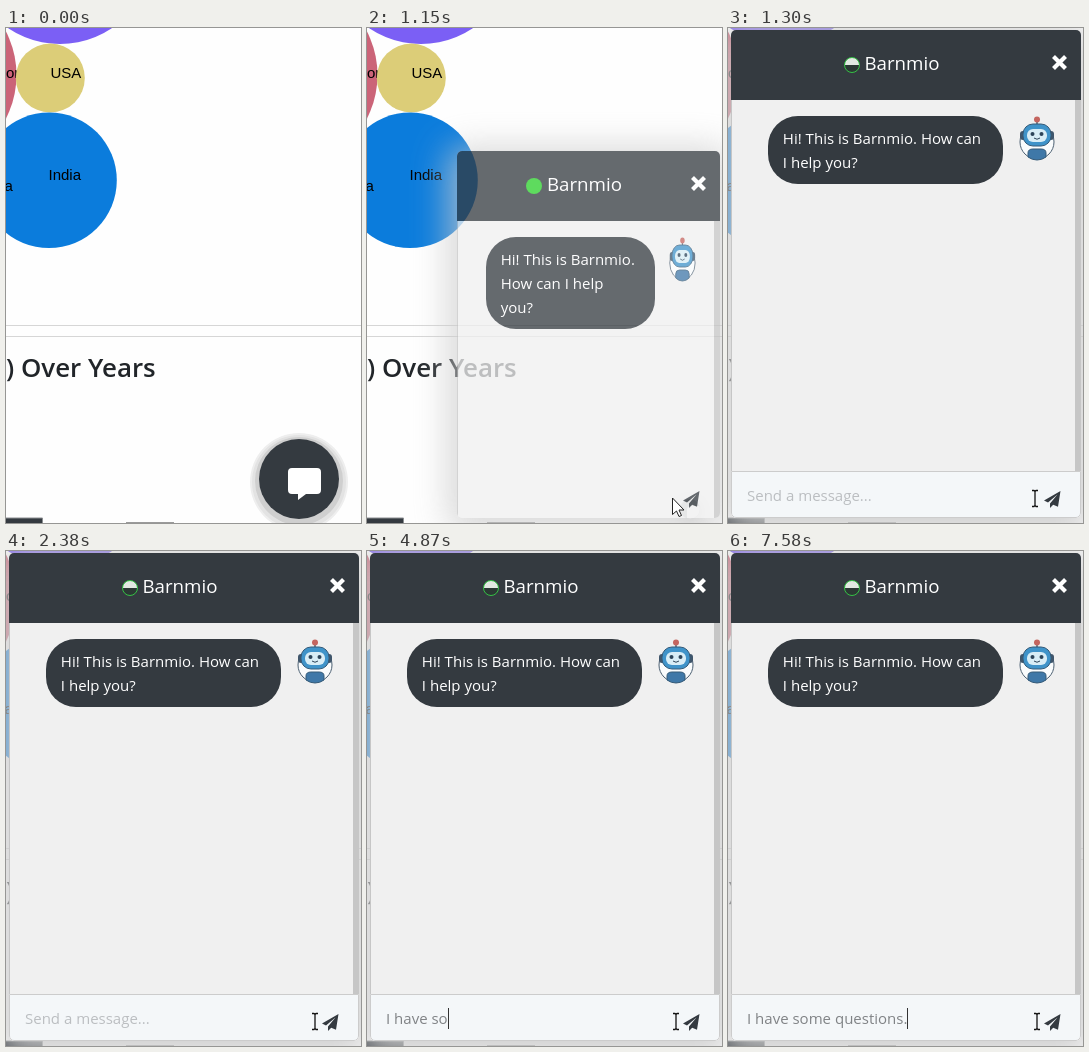
Animation of 355x495 px, one loop 8000 ms. Source, as an HTML page:

```html
<!DOCTYPE html>
<html lang="en">
<head>
<meta charset="utf-8">
<title>Chat widget</title>
<style>
  html, body { margin: 0; width: 100%; height: 100%; overflow: hidden; background: #fefefe; }
  #stage { position: relative; width: 355px; height: 495px; overflow: hidden; font: 15px/24px "Open Sans", sans-serif; }
  #stage > *, #panel > *, #body > * { position: absolute; box-sizing: border-box; }
  svg { display: block; overflow: visible; }

  #launcher { right: 22px; bottom: 4px; border-radius: 50%; background: #343a40; overflow: hidden;
    box-shadow: 0 3px 16px rgba(0,0,0,.6); }
  #launcher.idle { box-shadow: 0 2px 0 4px #cfcfcf, 0 3px 0 7px #e3e3e3, 0 3px 0 9px #eee; }
  #launcher svg { position: absolute; left: 36%; top: 36%; }

  #panel { right: 2px; bottom: 5px; overflow: hidden; border-radius: 5px; background: #f0f0f0;
    box-shadow: 0 5px 35px 9px #ccc; }
  #header { left: 0; top: 0; width: 100%; height: 70px; background: #343a40; color: #fff; text-align: center;
    font-size: 18.7px; font-weight: 500; line-height: 30px; padding: 18px max(0px, min(29px, 100% - 100px)) 0 0; }
  #dot { display: inline-block; box-sizing: border-box; width: 16px; height: 16px; vertical-align: -3px;
    border-radius: 50%; background: #2ad02a; }
  .open #dot { border: 1.5px solid #35c245; background: linear-gradient(#e2e8e2 50%, #2b3834 50%); }
  #close { left: max(84px, calc(100% - 29px)); top: 25px; }
  #body { left: 0; top: 70px; width: 100%; height: 371px; border: solid #c6c6c6; border-width: 0 6px 0 1px; }
  #bubble { left: calc(3.8px + 9.35%); right: calc(19.9px + 15.1%); top: 16px; padding: 10px 16px 10px 15px;
    border-radius: 30px; background: #343a40; color: #fff; font-weight: 500; }
  #avatar { right: calc(12px + 2.3%); top: 16px; width: 10.5%; height: 44px; }
  #input { left: 0; top: 441px; width: 350px; height: 47px; border: 1px solid #ccc; border-radius: 0 0 5px 5px;
    background: #f4f7f9; }
  #field { position: absolute; left: 15px; top: 13px; line-height: 21px; white-space: pre; color: #808386; }
  #field.empty { color: #bbbec1; }
  #caret { position: absolute; top: 13px; width: 1px; height: 21px; background: #333; }
  #send { right: 20px; bottom: 10px; }
</style>
</head>
<body>
<div id="stage">
  <svg width="355" height="495" font-family="Liberation Sans, Arial, sans-serif" font-size="15">
    <circle cx="54" cy="-76.5" r="92.5" fill="#7b5ff5"/>
    <circle cx="-84.5" cy="47" r="95" fill="#cb6478"/>
    <text x="0" y="50">or</text>
    <circle cx="44.3" cy="50" r="34.5" fill="#dccd78"/>
    <circle cx="43" cy="152.3" r="67.8" fill="#0b7cdc"/>
    <text x="44.5" y="50">USA</text>
    <text x="42.5" y="152">India</text>
    <text x="-1.5" y="163">a</text>
    <path d="M0 297.5H355M0 308.5H355" stroke="#d6d6d6"/>
    <text x="0" y="349" fill="#212529" font-family="Open Sans, sans-serif" font-size="25.9" font-weight="600">) Over Years</text>
    <path d="M0 490H36V495H0z" fill="#343a40"/>
    <path d="M0 490H36.5V495" fill="none" stroke="#8a8d90"/>
    <path d="M120 494.5H168" stroke="#9a9a9a"/>
  </svg>

  <div id="launcher">
    <svg width="33" height="32"><path fill="#fff" d="M4 0H29Q33 0 33 4V22Q33 26 29 26H18L10 32V26H4Q0 26 0 22V4Q0 0 4 0z"/></svg>
  </div>

  <div id="panel">
    <div id="header"><span id="dot"></span> Barnmio</div>
    <svg id="close" width="15" height="15"><path d="M1.5 1.5L13.5 13.5M13.5 1.5L1.5 13.5" stroke="#fff" stroke-width="4.2"/></svg>
    <div id="body">
      <div id="bubble">Hi! This is Barnmio. How can I help you?</div>
      <svg id="avatar" viewBox="0 0 36 44" preserveAspectRatio="none">
        <circle cx="18" cy="26" r="17" fill="#fafcfd" stroke="#4c6072"/>
        <path d="M18 4V9" stroke="#4c6072" stroke-width="1.5"/>
        <circle cx="18" cy="3.5" r="3" fill="#c4655f"/>
        <rect x="1" y="15" width="34" height="9" rx="3" fill="#40566b"/>
        <rect x="4" y="8" width="28" height="22" rx="10" fill="#3f93c9" stroke="#345a78"/>
        <rect x="8" y="13" width="20" height="13" rx="6" fill="#d8edf6"/>
        <circle cx="13.5" cy="18" r="2" fill="#2c4459"/>
        <circle cx="22.5" cy="18" r="2" fill="#2c4459"/>
        <path d="M15 22Q18 24.5 21 22" fill="none" stroke="#2c4459"/>
        <path d="M9 41V37Q9 33 14 33H22Q27 33 27 37V41Q23 44 18 44T9 41z" fill="#3f78a8" stroke="#345a78"/>
      </svg>
    </div>
    <div id="input"><span id="field"></span><i id="caret"></i></div>
    <svg id="send" width="17" height="17"><path fill="#343a40" d="M16.5 0L0 9.5L4 11.5L13.5 3.5L6 12.5V17L9.2 13.8L14 15.8z"/></svg>
  </div>

  <svg id="cursor" width="1" height="1" stroke-linejoin="round">
    <path id="hand" d="M-3 13V2Q-3 0-1.5 0T0 2V8Q2 6.5 3 8.5Q5 7.5 6 9.5Q9 8.5 9 12V16Q9 19 7 22H-3Q-5 18-8 14Q-8 11-5 12z" fill="#fff" stroke="#000"/>
    <path id="arrow" d="M-1.5 0V16.5L2.5 13L5 18.5L7.5 17.5L5 12H10z" fill="#fff" stroke="#222"/>
    <path id="beam" d="M-3-7.5H-1L0-6.5L1-7.5H3M0-6.5V7.5M-3 8.5H-1L0 7.5L1 8.5H3" fill="none" stroke="#111" stroke-width="1.3"/>
  </svg>
</div>

<script>
const LOOP = 8000;
const MESSAGE = "I have some questions.";
const openingSteps = [840, 930, 1010, 1070, 1150, 1230, 1300];
const entrySteps = [460, 530, 610];
// [time, number of typed characters]
const typing = [[2920, 1], [3300, 2], [3780, 3], [3850, 4], [4000, 5], [4170, 6], [4240, 7], [4640, 8],
  [4870, 9], [4940, 10], [5010, 12], [5410, 13], [5560, 14], [5640, 15], [5720, 16], [5870, 17],
  [5940, 18], [6020, 19], [6190, 20], [6250, 21], [7580, 22]];

const el = id => document.getElementById(id);
const [launcher, panel, field, caret, cursor] = ["launcher", "panel", "field", "caret", "cursor"].map(el);
const pointers = ["hand", "arrow", "beam"];

const between = (t, from, to) => t >= from && t < to;

function openness(t) {
  const step = openingSteps.findLast(s => s <= t) ?? 0;
  const p = Math.min(1, Math.max(0, (step - 925) / 337));
  return 0.5 - Math.cos(Math.PI * p) / 2;
}

function drawWindow(t) {
  const open = openness(t);
  const size = 80 * (1 - open) + "px";
  Object.assign(launcher.style, { width: size, height: size, opacity: 1 - open, display: open < 1 ? "" : "none" });
  launcher.classList.toggle("idle", t < 840);
  Object.assign(panel.style, { width: 350 * open + "px", height: 488 * open + "px", opacity: open, display: open ? "" : "none" });
  panel.classList.toggle("open", open === 1);
}

function drawInput(t) {
  const typed = typing.findLast(([time]) => time <= t)?.[1] ?? 0;
  field.textContent = typed ? MESSAGE.slice(0, typed) : "Send a message...";
  field.classList.toggle("empty", !typed);
  caret.style.left = 15 + (typed ? field.offsetWidth : 0) + "px";
  const visible = between(t, 1780, 2300) || (t >= 2920 && !between(t, 6800, 7280));
  caret.style.display = visible ? "" : "none";
}

function drawCursor(t) {
  const kind = t < 1010 ? "hand" : between(t, 1150, 1300) ? "arrow" : "beam";
  for (const name of pointers) el(name).style.display = name === kind ? "" : "none";
  const entered = entrySteps.filter(s => s <= t).length;
  cursor.style.display = entered ? "" : "none";
  cursor.style.left = (t < 2380 ? 307 : 309) + "px";
  cursor.style.top = 470 + 10 * (entrySteps.length - entered) + "px";
}

function frame() {
  const t = performance.now() % LOOP;
  drawWindow(t);
  drawInput(t);
  drawCursor(t);
  requestAnimationFrame(frame);
}
frame();
</script>
</body>
</html>
```
